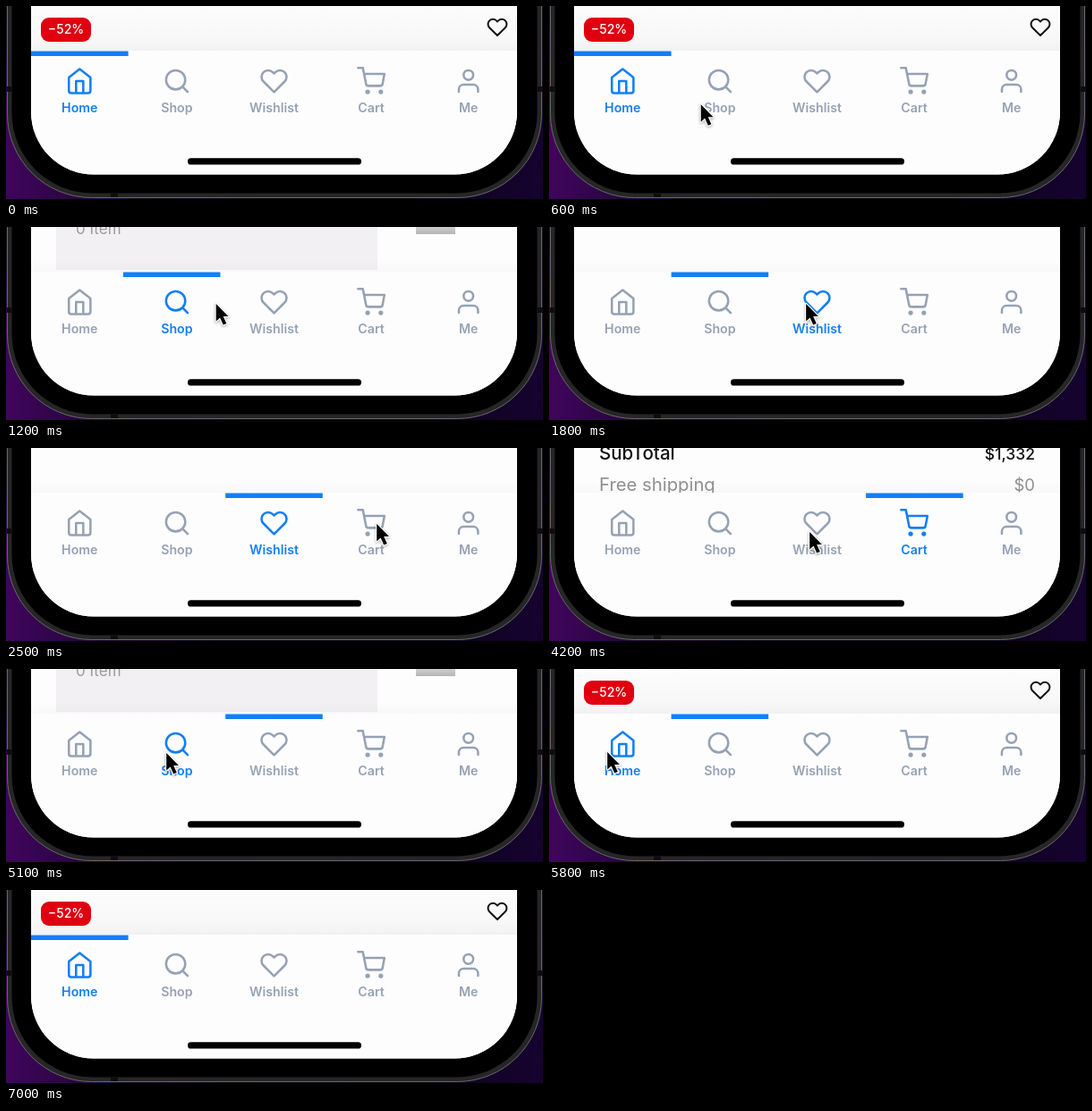
An HTML page with a canvas that plays this animation: 600x216 px, repeating every 7.2 s.

```html
<!DOCTYPE html>
<html lang="en">
<head>
<meta charset="utf-8">
<title>Tab bar</title>
<style>
html, body { margin: 0; width: 100%; height: 100%; overflow: hidden; background: #000; }
canvas { display: block; width: 100vw; height: 100vh; }
</style>
</head>
<body>
<canvas id="stage" width="600" height="216"></canvas>
<script>
const ctx = document.getElementById('stage').getContext('2d');
const LOOP = 7200, STEP = 100;
const BLUE = '#127ff3', GREY = '#95a2b4';
const LEFT = 28, TAB = 108.6, SLIDE = 420;

const HEART = 'M20.84 4.61a5.5 5.5 0 0 0-7.78 0L12 5.67l-1.06-1.06a5.5 5.5 0 0 0-7.78 7.78L12 21.23l8.84-8.84a5.5 5.5 0 0 0 0-7.78z';
const tabs = [
  ['Home', 'M3 9l9-7 9 7v11a2 2 0 0 1-2 2H5a2 2 0 0 1-2-2z M9 22V12h6v10'],
  ['Shop', 'M19 11a8 8 0 1 1-16 0a8 8 0 1 1 16 0z M21 21l-4.35-4.35'],
  ['Wishlist', HEART],
  ['Cart', 'M1 1h4l2.68 13.39a2 2 0 0 0 2 1.61h9.72a2 2 0 0 0 2-1.61L23 6H6 M10 21a1 1 0 1 1-2 0a1 1 0 1 1 2 0z M21 21a1 1 0 1 1-2 0a1 1 0 1 1 2 0z'],
  ['Me', 'M20 21v-2a4 4 0 0 0-4-4H8a4 4 0 0 0-4 4v2 M16 7a4 4 0 1 1-8 0a4 4 0 1 1 8 0z']
].map(([label, d]) => ({ label, icon: new Path2D(d) }));
const heart = tabs[2].icon;
const arrow = new Path2D('M1.2 2V21.5L5.6 17.4L9.2 25.6L12.8 24L9.2 16.1H15Z');

// [time, tab]
const clicks = [[900, 1], [1800, 2], [2600, 3], [3300, 4], [3810, 3], [4500, 2], [5100, 1], [5800, 0]];
// [time, x, y] of the pointer tip
const route = [
  [50, 110, 222], [800, 181, 84], [900, 181, 84], [1500, 286, 84], [1800, 286, 84],
  [2400, 413, 83], [2600, 413, 83], [3200, 520, 86], [3350, 520, 86], [3700, 405, 88],
  [3850, 405, 88], [4200, 290, 92], [4500, 290, 92], [4800, 178, 92], [5100, 178, 92],
  [5600, 64, 91], [5850, 64, 91], [6250, 100, -32]
];

const mix = (a, b, k) => a + (b - a) * k;
const smooth = k => k * k * (3 - 2 * k);
const bez = (a, b, u) => 3 * a * u * (1 - u) ** 2 + 3 * b * u * u * (1 - u) + u ** 3;

// cubic-bezier(.25, .1, .25, 1)
function ease(k) {
  if (k <= 0 || k >= 1) return Math.min(1, Math.max(0, k));
  let lo = 0, hi = 1;
  for (let i = 0; i < 24; i++) {
    const mid = (lo + hi) / 2;
    if (bez(.25, .25, mid) < k) lo = mid; else hi = mid;
  }
  return bez(.1, 1, lo);
}

function tabState(t) {
  let active = 0, bar = 0;
  for (const [start, tab] of clicks) {
    if (t < start) break;
    bar = mix(active, tab, ease((t - start) / SLIDE));
    active = tab;
  }
  return { active, bar };
}

function pointerAt(t) {
  const i = route.findIndex(p => p[0] > t);
  if (i < 1) return null;
  const [t0, x0, y0] = route[i - 1], [t1, x1, y1] = route[i];
  const k = smooth((t - t0) / (t1 - t0));
  return [mix(x0, x1, k), mix(y0, y1, k)];
}

function box(x, y, w, h, r, fill, stroke) {
  ctx.beginPath();
  ctx.roundRect(x, y, w, h, r);
  if (fill) { ctx.fillStyle = fill; ctx.fill(); }
  if (stroke) { ctx.strokeStyle = stroke; ctx.stroke(); }
}

function text(s, x, y, size, color, weight = 400, align = 'left') {
  ctx.font = `${weight} ${size}px Inter, "Open Sans", sans-serif`;
  ctx.textAlign = align;
  ctx.fillStyle = color;
  ctx.fillText(s, x, y);
}

function icon(path, cx, cy, scale, color, width) {
  ctx.save();
  ctx.translate(cx, cy);
  ctx.scale(scale, scale);
  ctx.translate(-12, -12);
  ctx.lineWidth = width;
  ctx.lineCap = ctx.lineJoin = 'round';
  ctx.strokeStyle = color;
  ctx.stroke(path);
  ctx.restore();
}

function vertical(y0, y1, ...colors) {
  const g = ctx.createLinearGradient(0, y0, 0, y1);
  colors.forEach((c, i) => g.addColorStop(i / (colors.length - 1), c));
  return g;
}

function drawPhone() {
  const sky = ctx.createLinearGradient(0, 0, 600, 0);
  ['#40055c', '#150528', '#080614', '#0b0518', '#16022f'].forEach((c, i) => sky.addColorStop(i / 4, c));
  ctx.fillStyle = sky;
  ctx.fillRect(0, 0, 600, 216);
  ctx.fillStyle = vertical(0, 140, 'rgba(8,6,12,.85)', 'rgba(8,6,12,0)');
  ctx.fillRect(0, 0, 600, 140);
  ctx.lineWidth = 1;
  box(1.5, -200, 597, 414.5, 94, '#262627', '#6a686b');
  box(6.5, -200, 587, 409.5, 90, '#000');
  ctx.fillStyle = '#0d0d0e';
  ctx.fillRect(1, 90, 5, 6);
  ctx.fillRect(594, 90, 5, 6);
  ctx.fillRect(117, 210, 8, 4);
}

function drawHome() {
  ctx.fillStyle = vertical(0, 50, '#fdfcfd', '#f7f6f7');
  ctx.fillRect(LEFT, 0, 543, 50);
  box(39, 13, 56, 27, 9, '#e0000f');
  text('−52%', 67, 31.3, 14, '#fff', 500, 'center');
  icon(heart, 549, 23.8, 1, '#111', 2);
}

function drawShop() {
  ctx.fillStyle = '#f2f0f3';
  ctx.fillRect(56, 0, 359, 48);
  text('0 Item', 78, 7.5, 17, '#9b9a9d');
  ctx.fillStyle = vertical(0, 8, '#cfcfcf', '#b4b4b4');
  ctx.fillRect(458, 0, 44, 8);
}

function drawCart() {
  text('SubTotal', 56, 12.8, 20.5, '#111', 500);
  text('$1,332', 543, 12.8, 17.5, '#111', 500, 'right');
  text('Free shipping', 56, 47.5, 20.3, '#918f92');
  text('$0', 543, 47.5, 18.5, '#918f92', 400, 'right');
}

function drawMe() {
  text('© Tillorne 2020', 56, 18.5, 15.3, '#858387');
  ctx.lineWidth = 1;
  for (let i = 0; i < 4; i++) box(288 + i * 69.7, -10, 46, 47, 5, '#fff', '#ebe9ed');
  box(302, 4, 17, 17, 0, '#2b4b8e');
  box(373, 4, 17, 17, 0, '#cb2a31');
  box(441, 4, 18, 18, 9, '#2f97e8');
  box(510, 3, 19, 19, 9.5, '#bd1528');
}

const pages = [drawHome, drawShop, () => {}, drawCart, drawMe];

function drawTabs(active, bar) {
  ctx.fillStyle = vertical(36, 50, 'rgba(30,20,40,0)', 'rgba(30,20,40,.025)');
  ctx.fillRect(LEFT, 36, 543, 14);
  ctx.fillStyle = '#fefdfe';
  ctx.fillRect(LEFT, 50, 543, 140);
  ctx.fillStyle = BLUE;
  ctx.fillRect(LEFT + bar * TAB, 50.5, TAB, 5.5);
  tabs.forEach((tab, i) => {
    const x = LEFT + (i + .5) * TAB, color = i === active ? BLUE : GREY;
    icon(tab.icon, x, 84, 1.34, color, 1.9);
    text(tab.label, x, 119, 14.2, color, 600, 'center');
  });
  box(203, 170.3, 194, 7.2, 3.6, '#000');
}

function drawPointer([x, y]) {
  ctx.save();
  ctx.translate(x, y);
  ctx.lineJoin = 'round';
  ctx.lineWidth = 2.4;
  ctx.strokeStyle = '#fff';
  ctx.shadowColor = 'rgba(0,0,0,.35)';
  ctx.shadowBlur = 3;
  ctx.shadowOffsetY = 1;
  ctx.stroke(arrow);
  ctx.shadowColor = 'transparent';
  ctx.fillStyle = '#000';
  ctx.fill(arrow);
  ctx.restore();
}

function draw(t) {
  const { active, bar } = tabState(t);
  drawPhone();
  ctx.save();
  ctx.beginPath();
  ctx.roundRect(LEFT, -200, 543, 388.5, 70);
  ctx.clip();
  ctx.fillStyle = '#fefdfe';
  ctx.fillRect(LEFT, 0, 543, 190);
  pages[active]();
  drawTabs(active, bar);
  ctx.restore();
  const tip = pointerAt(t);
  if (tip) drawPointer(tip);
}

// The picture advances ten times a second.
const origin = performance.now();
function frame() {
  const t = (performance.now() - origin) % LOOP;
  draw(Math.floor(t / STEP) * STEP);
  requestAnimationFrame(frame);
}
frame();
</script>
</body>
</html>
```
